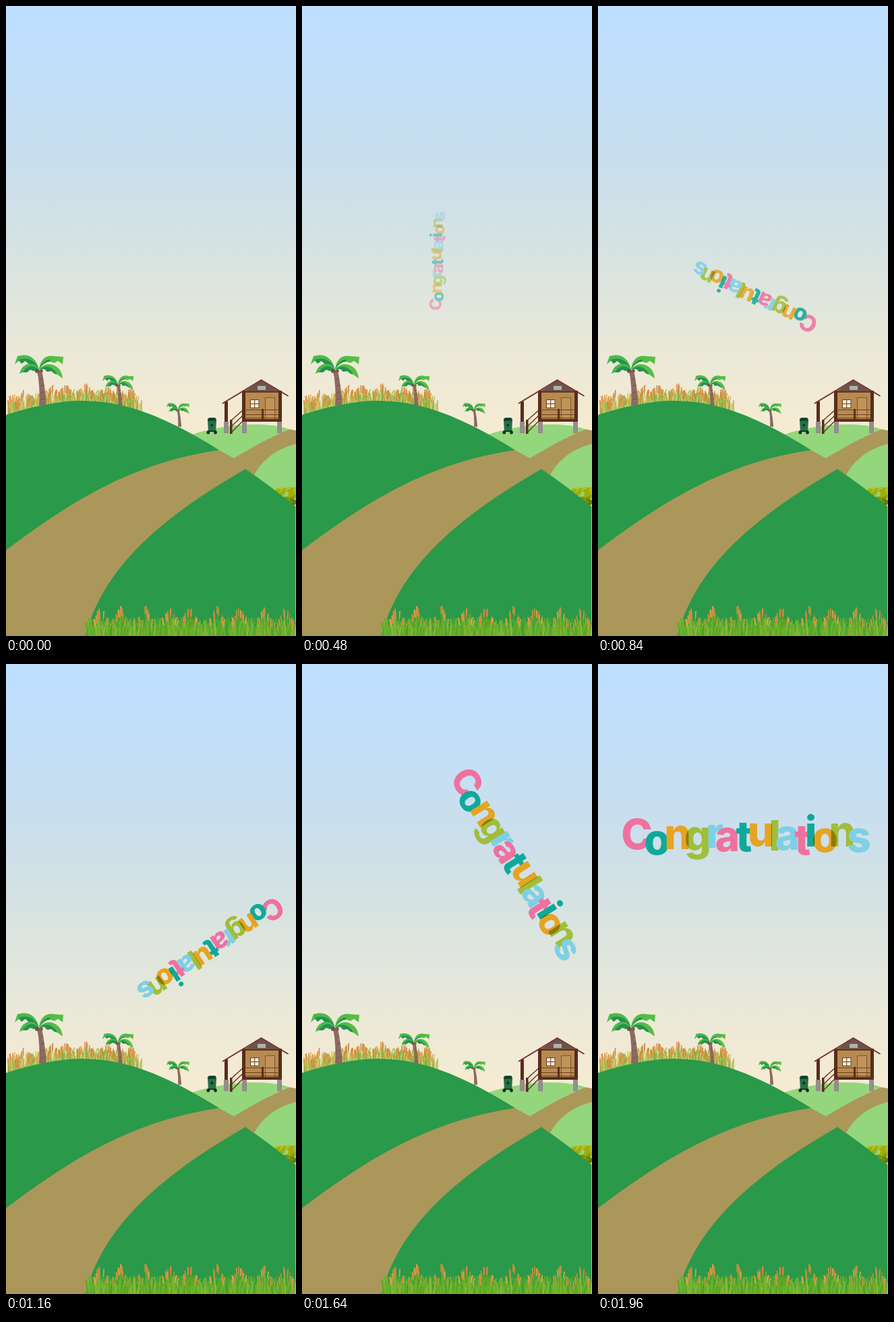
Animation of 430 by 932 pixels, one loop 2 s. Source, as an HTML page:

```html
<!DOCTYPE html>
<html lang="en">
<head>
<meta charset="utf-8">
<title>Congratulations</title>
<style>
  html, body { margin: 0; width: 100%; height: 100%; overflow: hidden; }
  svg { display: block; width: 430px; height: 932px; }
  #title { isolation: isolate; font: 800 62.5px Inter, Lato, sans-serif; text-anchor: middle; }
  .blend { mix-blend-mode: multiply; }
</style>
</head>
<body>
<svg viewBox="0 0 430 932" xmlns="http://www.w3.org/2000/svg">
  <defs>
    <linearGradient id="sky" gradientUnits="userSpaceOnUse" x1="0" y1="0" x2="0" y2="620">
      <stop offset="0.05" stop-color="#bfdfff"/>
      <stop offset="0.29" stop-color="#c6dff2"/>
      <stop offset="0.44" stop-color="#cddfe9"/>
      <stop offset="0.63" stop-color="#dae4e0"/>
      <stop offset="0.81" stop-color="#e9e8d8"/>
      <stop offset="1" stop-color="#f5ebd2"/>
    </linearGradient>
    <g id="palm">
      <path d="M-3 1 Q2 25 0 53 H11 Q9 25 4 1Z" fill="#8c6b62"/>
      <path d="M1 14 l5 -1 M2 24 l6 -1 M2 34 l7 -1 M2 44 l8 -1" stroke="#765750" stroke-width="1"/>
      <path d="M0 0 C-4 -18 -16 -25 -32 -20 L-36 -8 L-30 -13 L-26 -9 L-20 -13 L-15 -8 C-8 -9 -4 -6 0 0Z" fill="#4db848"/>
      <path d="M0 0 C-5 -12 -14 -19 -30 -15 L-26 -9 L-20 -13 L-15 -8 C-8 -9 -4 -6 0 0Z" fill="#239350"/>
      <path d="M0 0 C1 -14 10 -23 22 -20 L36 -19 L35 -8 L28 -13 L23 -10 L16 -12 C9 -11 4 -7 0 0Z" fill="#55bd45"/>
      <path d="M0 0 C3 -9 9 -15 17 -15 L16 -12 C9 -11 4 -7 0 0Z" fill="#239350"/>
      <path d="M0 0 C-10 -14 -25 -10 -29 6 L-22 3 L-18 4 L-13 0 L-8 2Z" fill="#4db848"/>
      <path d="M0 0 C-9 -9 -19 -6 -24 4 L-18 4 L-13 0 L-8 2Z" fill="#239350"/>
      <path d="M0 0 C10 -15 34 -8 35 13 L27 7 L23 6 L18 2 L12 3 L8 -1Z" fill="#55bd45"/>
      <path d="M2 -1 C10 -8 21 -4 27 7 L23 6 L18 2 L12 3 L8 -1Z" fill="#239350"/>
      <circle cx="-3" cy="2" r="3" fill="#755145"/>
      <circle cx="3" cy="2" r="2.8" fill="#805c50"/>
    </g>
  </defs>

  <rect width="430" height="932" fill="url(#sky)"/>

  <path d="M0 640 H430 V741 H429.3 V932 H0Z" fill="#ab9759"/>
  <path d="M338 669 Q390 638 420 626 L430 628 V660 H338Z" fill="#ab9759"/>
  <path d="M262 639 C300 624 340 619 370 619 C392 619 408 622 420 626 Q390 638 338 669 L310 654Z" fill="#93d67b"/>
  <path d="M430 648 C404 654 380 670 368 694 L430 742Z" fill="#93d67b"/>

  <g id="hillGrass" fill="none" stroke-linecap="round"></g>
  <use href="#palm" transform="translate(49 538)"/>
  <use href="#palm" transform="translate(166 560) scale(.64)"/>
  <use href="#palm" transform="translate(255 597.5) scale(.47)"/>
  <path d="M0 605 C40 592 78 584 113 584 C180 584 240 610 316 657 C190 675 100 730 0 805Z" fill="#2a9949"/>

  <g id="bush"></g>
  <path d="M355 685 Q395 712 429.3 741 V932 H117 C141 850 196 776 355 685Z" fill="#2a9949"/>
  <g id="frontGrass" fill="none" stroke-linecap="round"></g>

  <g id="bin">
    <path d="M299 613 H312 L311 630 H300Z" fill="#247246"/>
    <path d="M299 614 V611 Q300 609 303 609 H309 Q312 609 312 614Z" fill="#174b31"/>
    <path d="M301 611.5 H309" stroke="#0f3022" stroke-width="1.5"/>
    <circle cx="305.3" cy="620" r="2.3" fill="#123c28"/>
    <path d="M299 629 H312" stroke="#173c2b" stroke-width="2"/>
    <circle cx="299.8" cy="631" r="2.4" fill="#222"/>
    <circle cx="310.5" cy="631" r="2.4" fill="#222"/>
  </g>

  <g id="house">
    <path d="M323 615 h7 v17 h-7Z M350 615 h7 v17 h-7Z M402 615 h7 v17 h-7Z" fill="#958d8d"/>
    <path d="M352 571 L378 554 L407 571Z" fill="#6b5548"/>
    <rect x="352" y="571" width="55" height="42" fill="#b78a50"/>
    <rect x="373" y="562" width="12" height="6" fill="#b3b0ac"/>
    <rect x="384.5" y="579.5" width="14" height="32" fill="#c0935a" stroke="#80552e"/>
    <rect x="362.5" y="582.5" width="12.5" height="12" fill="#f3ead8" stroke="#654126"/>
    <path d="M368.7 582 V595 M362 588.5 H375" stroke="#654126"/>
    <path d="M355 597.5 H405 M355 604.5 H405 M355 609.5 H405" stroke="#703e20" stroke-width="1.2"/>
    <path d="M380.5 596 V612" stroke="#5a2e1a" stroke-width="3"/>
    <path d="M333 614 L351 598 M334 622 L351 606 M334 631 L351 614" stroke="#683b24" stroke-width="1.6"/>
    <path d="M324 585 h5 v30 h-5Z M332 612 h3.5 v21 h-3.5Z M350 569 h5 v45 h-5Z M404 569 h5 v45 h-5Z M350 611 h59 v4 h-59Z M350 570 h59 v1.8 h-59Z" fill="#592c1b"/>
    <path d="M321 588 L378.5 553.5 L418.5 577" fill="none" stroke="#7a2f34" stroke-width="2"/>
  </g>

  <g id="title"></g>
</svg>
<script>
const LOOP = 2000, STEP = 40, ROLL = 1955;
const PIVOT = { x: 246, y: 368 };
const get = id => document.getElementById(id);

function add(parent, tag, attrs, text = '') {
  const el = document.createElementNS('http://www.w3.org/2000/svg', tag);
  for (const key in attrs) el.setAttribute(key, attrs[key]);
  el.textContent = text;
  parent.appendChild(el);
  return el;
}

function randomFrom(seed) {
  return () => (seed = seed * 16807 % 2147483647) / 2147483647;
}

function stroke(group, color, width, x0, y0, x1, y1) {
  const points = [x0, y0, x0, (y0 + y1) / 2, x1, y1].map(v => v.toFixed(1));
  add(group, 'path', { d: `M${points[0]} ${points[1]}Q${points.slice(2).join(' ')}`, stroke: color, 'stroke-width': width.toFixed(1) });
}

// A row of thin blades, with a fan of ripe stalks around each tuft position.
function growGrass(group, { from, to, count, seed, base, blade, stalk, tufts, greens }) {
  const rnd = randomFrom(seed);
  const pick = list => list[Math.floor(rnd() * list.length)];
  const clamp = x => Math.min(to, Math.max(from, x));
  for (let i = 0; i < count; i++) {
    const x = from + (to - from) * rnd(), foot = base(x);
    stroke(group, pick(greens), 0.6 + rnd() * 0.6, x, foot, clamp(x + (rnd() - 0.5) * 10), foot - blade * (0.4 + 0.6 * rnd()));
  }
  for (const tuft of tufts) {
    for (let i = 0; i < 13; i++) {
      const lean = rnd() * 2 - 1, x = clamp(tuft + lean * 13), foot = base(x);
      const tip = foot - stalk * (1 - 0.45 * Math.abs(lean) - 0.12 * rnd());
      stroke(group, pick(greens), 0.7, tuft + lean * 6, foot, x, tip);
      stroke(group, pick(heads), 1 + rnd() * 0.9, x - lean * 2, tip + 10, x, tip);
    }
  }
}

const heads = ['#d9913f', '#cf8a45', '#e0a653', '#d5883a'];

growGrass(get('hillGrass'), {
  from: 3, to: 201, count: 420, seed: 71, blade: 23, stalk: 33,
  base: x => 590 + ((x - 113) / 113) ** 2 * 17,
  tufts: [9, 26, 53, 68, 88, 118, 150, 167, 186],
  greens: ['#86ad36', '#a9bd4b', '#c8bd5c', '#d6b962', '#79a533']
});

add(get('frontGrass'), 'path', { d: 'M119 932 L124 920 H429 V932Z', fill: '#55a325', opacity: 0.6 });
growGrass(get('frontGrass'), {
  from: 119, to: 429, count: 800, seed: 29, blade: 29, stalk: 47,
  base: () => 934,
  tufts: [141, 170, 207, 243, 272, 313, 346, 384, 414],
  greens: ['#58a51f', '#6bb52b', '#83bb35', '#4ba32a', '#9bb83d']
});

const leafRnd = randomFrom(13);
for (let i = 0; i < 110; i++) {
  const x = 400 + leafRnd() * 32, depth = leafRnd();
  const shade = Math.min(3, Math.floor(depth * 3 + leafRnd()));
  add(get('bush'), 'circle', {
    cx: x, cy: 712 + depth * 24 + Math.abs(x - 417) * 0.12, r: 1.4 + leafRnd() * 1.7,
    fill: ['#b2bc1b', '#9dad0b', '#819700', '#687b05'][shade]
  });
}

const PINK = '#ef719f', TEAL = '#10a89c', GOLD = '#e5a421', LIME = '#a0be39', BLUE = '#7fcfe5';
const BLEND = 'blend';
const letters = [
  ['C', 57.5, 274, PINK], ['o', 87.5, 281.5, TEAL], ['n', 118, 273.5, GOLD],
  ['g', 148, 276, LIME, BLEND], ['r', 173, 272, BLUE], ['a', 192, 276.5, PINK],
  ['t', 216.5, 276.5, TEAL], ['u', 241.5, 269.5, GOLD], ['l', 262, 276, LIME, BLEND],
  ['a', 281, 274.5, BLUE], ['t', 303.5, 281.5, PINK], ['i', 315.5, 270, TEAL],
  ['o', 336.5, 277.5, GOLD, BLEND], ['n', 362, 269.5, LIME, BLEND], ['s', 387, 277.5, BLUE]
];
const title = get('title');
for (const [char, x, y, fill, style = ''] of letters) add(title, 'text', { x, y, fill, class: style }, char);

function draw(time) {
  const p = Math.min(1, time / ROLL);
  const { x, y } = PIVOT;
  title.setAttribute('transform',
    `translate(${x} ${y}) rotate(${360 * (1 - p)}) scale(${0.2 + 0.8 * p}) translate(${-x} ${-y})`);
  title.setAttribute('opacity', Math.min(1, p * 2));
}

function tick() {
  draw(Math.floor(performance.now() % LOOP / STEP) * STEP);
  requestAnimationFrame(tick);
}
tick();
</script>
</body>
</html>
```
